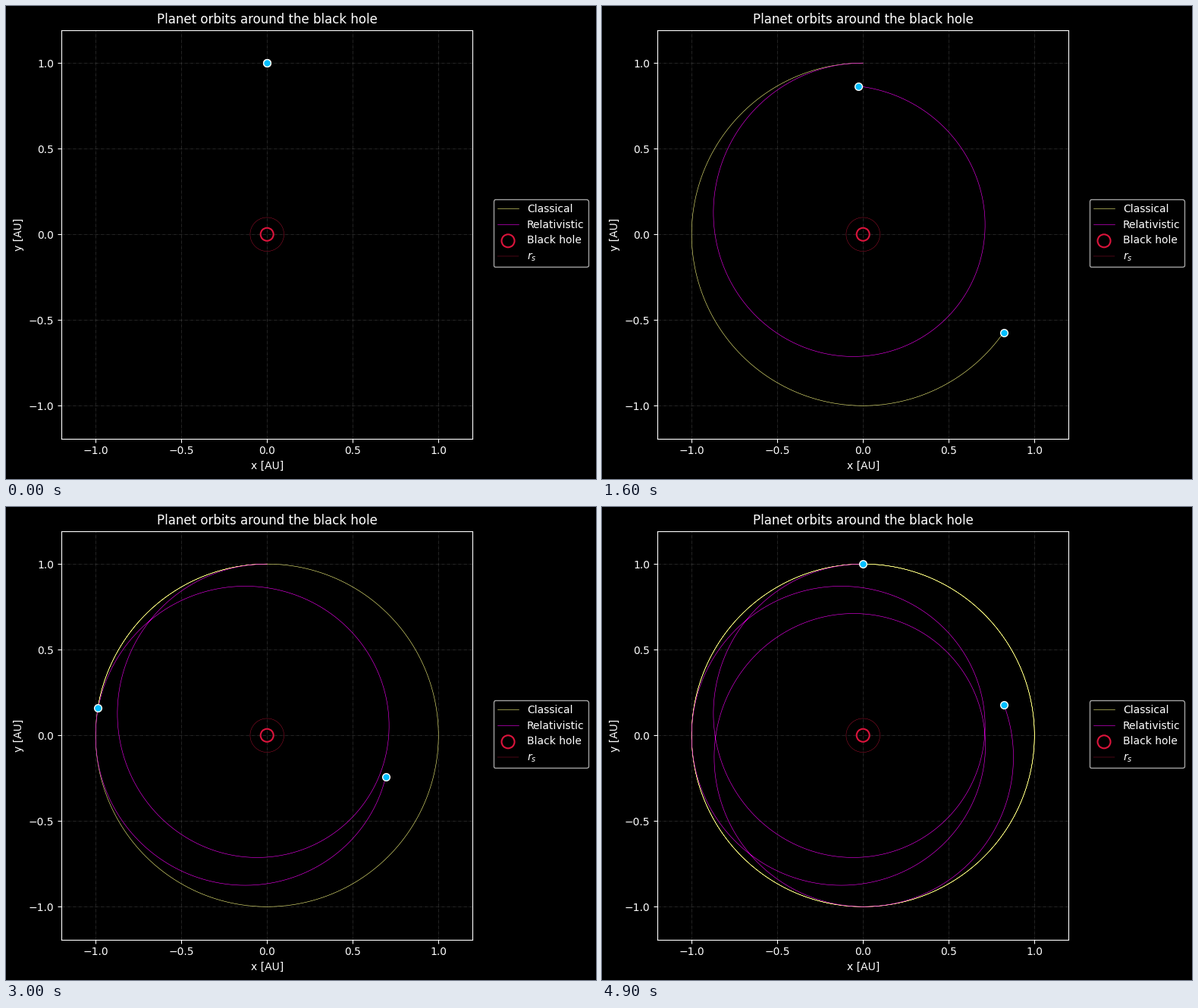
Animation, 778 px wide and 624 px high, one loop 5000 ms. Source, as a matplotlib script:

```python
import matplotlib.pyplot as plt
import numpy as np
from matplotlib.animation import FuncAnimation

WIDTH, HEIGHT, DPI = 778, 624, 100
FRAMES, INTERVAL = 50, 100
STEPS = 60                      # integration steps per frame
R_S = 0.0987                    # Schwarzschild radius, AU
DT = 4 * np.pi / (FRAMES - 1) / STEPS

plt.rcParams.update({
    "font.family": "DejaVu Sans", "font.size": 10,
    "text.color": "white", "axes.labelcolor": "white", "axes.edgecolor": "white",
    "xtick.color": "white", "ytick.color": "white",
    "figure.facecolor": "black", "axes.facecolor": "black",
    "savefig.facecolor": "black",
})


def derivative(state, r_s):
    """Motion with GM = 1 and angular momentum 1, in proper time."""
    pos, vel = state
    r = np.hypot(*pos)
    return np.array([vel, -pos / r**3 * (1 + 1.5 * r_s / r**2)])


def integrate(r_s):
    state = np.array([[0.0, 1.0], [-1.0, 0.0]])
    path = [state[0]]
    for _ in range((FRAMES - 1) * STEPS):
        k1 = derivative(state, r_s)
        k2 = derivative(state + DT / 2 * k1, r_s)
        k3 = derivative(state + DT / 2 * k2, r_s)
        k4 = derivative(state + DT * k3, r_s)
        state = state + DT / 6 * (k1 + 2 * k2 + 2 * k3 + k4)
        path.append(state[0])
    return np.array(path)


fig = plt.figure(figsize=(WIDTH / DPI, HEIGHT / DPI), dpi=DPI)
ax = fig.add_axes([72.95 / WIDTH, 53.25 / HEIGHT, 542.5 / WIDTH, 539 / HEIGHT])
y_max = 1.2 * 539 / 542.5
ax.set(xlim=(-1.2, 1.2), ylim=(-y_max, y_max), xlabel="x [AU]", ylabel="y [AU]")
ax.set_title("Planet orbits around the black hole")
ticks = [-1, -0.5, 0, 0.5, 1]
ax.set_xticks(ticks)
ax.set_yticks(ticks)
ax.grid(color="white", alpha=0.2, lw=0.5, ls="-.")

orbits = []
for label, color, r_s in (("Classical", "#ffff80", 0), ("Relativistic", "magenta", R_S)):
    trail, = ax.plot([], [], color=color, lw=0.4, label=label)
    planet, = ax.plot([], [], "o", ms=7, mfc="deepskyblue", mec="white", mew=1, zorder=5)
    orbits.append((integrate(r_s), trail, planet))

ax.scatter(0, 0, s=150, facecolors="none", edgecolors="crimson", linewidths=1.5,
           label="Black hole", zorder=3)
angle = np.linspace(0, 2 * np.pi, 200)
ax.plot(R_S * np.cos(angle), R_S * np.sin(angle), color="crimson", lw=0.25, label="$r_s$")
ax.legend(loc=(1.05, 0.42), edgecolor="0.8")


def update(frame):
    last = frame * STEPS
    for path, trail, planet in orbits:
        trail.set_data(*path[:last + 1].T)
        planet.set_data(*path[last:last + 1].T)
    return [artist for orbit in orbits for artist in orbit[1:]]


anim = FuncAnimation(fig, update, frames=FRAMES, interval=INTERVAL,
                     repeat=True, repeat_delay=0)
plt.show()
```
